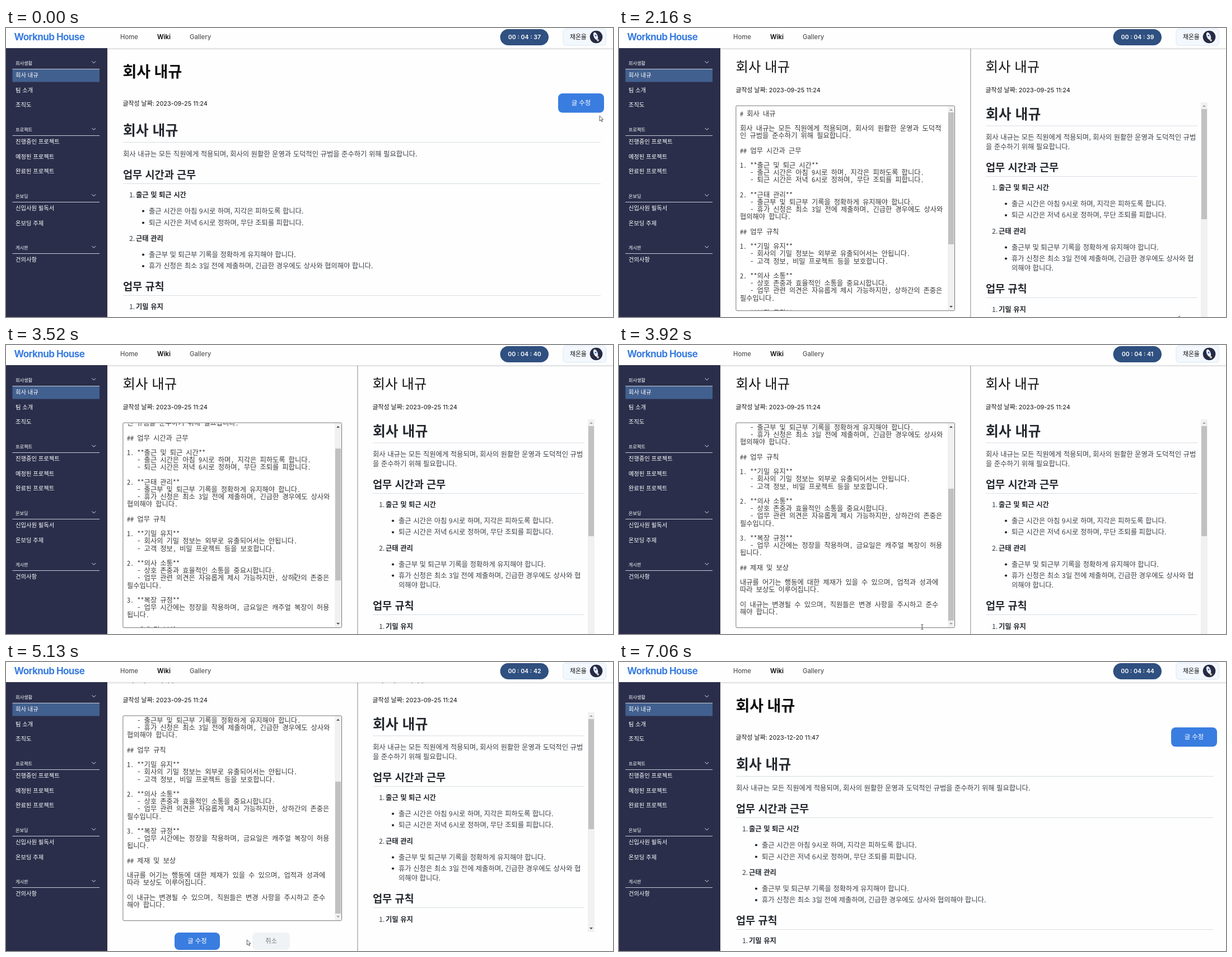
Recreate the animation shown at these times as an HTML page. Size 1084 by 517 pixels, loop 7.12 s.

```html
<!DOCTYPE html>
<html lang="ko">
<head>
<meta charset="utf-8">
<style>
html, body { margin: 0; width: 100%; height: 100%; overflow: hidden; background: #fefefe; }
svg { display: block; width: 100vw; height: 100vh; }
text { font-family: Inter, 'Noto Sans CJK KR', 'Noto Sans CJK', sans-serif; white-space: pre; }
.doc text { font-family: 'Noto Sans CJK KR', 'Noto Sans CJK', 'Noto Sans', sans-serif; }
.mono text { font-family: 'Noto Sans Mono CJK KR', 'Noto Sans Mono', monospace; }
</style>
</head>
<body>
<svg id="stage" viewBox="0 0 1084 517"></svg>
<script>
const LOOP = 7120;
const BLUE = '#3a7de0', HOVER = '#2f6ccb';
const BRAND = 'Worknub House', USER = '채온율';

// y is the vertical centre of the glyphs
const text = (x, y, str, size, fill = '#111', extra = '') =>
  `<text x="${x}" y="${(y + size * .37).toFixed(2)}" font-size="${size}" fill="${fill}" ${extra}>${str}</text>`;
const rect = (x, y, w, h, fill, extra = '') =>
  `<rect x="${x}" y="${y}" width="${w}" height="${h}" fill="${fill}" ${extra}/>`;
const group = (id, body, extra = '') => `<g id="${id}" ${extra}>${body}</g>`;
const clip = (id, x, y, w, h) => `<clipPath id="${id}">${rect(x, y, w, h, '#000')}</clipPath>`;
const BOLD = 'font-weight="700"', SEMI = 'font-weight="600"', MID = 'text-anchor="middle"';
const BRAND_STYLE = `${BOLD} letter-spacing="-.6"`;

const button = (id, x, y, w, h, label, fill, ink) =>
  rect(x, y, w, h, fill, `id="${id}" rx="8"`) + text(x + w / 2, y + h / 2 - .6, label, 11.4, ink, MID);

const triangle = (id, x, y, dir, fill) =>
  `<path id="${id}" d="M${x - 3},${y + dir * 1.5}h6l-3,${-dir * 3.2}z" fill="${fill}"/>`;

function scrollbar(id, x, top, bottom, thumbTop, thumbHeight) {
  const mid = x + 6;
  return rect(x, top, 12, bottom - top, '#f1f1f1') +
    rect(x + 1, thumbTop, 10, thumbHeight, '#c1c1c1', `id="${id}Thumb"`) +
    triangle(id + 'Up', mid, top + 6.5, 1, '#a3a3a3') +
    triangle(id + 'Down', mid, bottom - 6.5, -1, '#505050');
}

// Rendered markdown: each row is [kind, y, string]
function markdown(x, width, rows) {
  const ink = '#24292f', soft = '#3a3f45', size = 12.35;
  const rule = y => rect(x, y, width, 1, '#d8dee4');
  const kinds = {
    h1: (y, s) => text(x, y, s, 24.8, ink, SEMI) + rule(y + 21),
    h2: (y, s) => text(x, y, s, 18.6, ink, SEMI) + rule(y + 16),
    p: (y, s) => text(x, y, s, size, soft),
    num: (y, s) => text(x + 11, y, s.slice(0, 2), size, soft) + text(x + 23, y, s.slice(3), size, ink, SEMI),
    li: (y, s) => `<circle cx="${x + 36}" cy="${y + .5}" r="2.1" fill="${ink}"/>` + text(x + 46, y, s, size, soft),
    more: (y, s) => text(x + 46, y, s, size, soft)
  };
  return `<g class="doc">${rows.map(([kind, y, s]) => kinds[kind](y, s)).join('')}</g>`;
}

const DATE = '글작성 날짜:', DATE_SIZE = 10.9;
const TITLE = '회사 내규';
const intro = ['회사 내규는 모든 직원에게 적용되며, 회사의 원활한 운영과 도덕적인 규범', '을 준수하기 위해 필요합니다.'];
const hours = '업무 시간과 근무', rules = '업무 규칙';
const arrive = '출근 시간은 아침 9시로 하며, 지각은 피하도록 합니다.';
const leave = '퇴근 시간은 저녁 6시로 정하며, 무단 조퇴를 피합니다.';
const record = '출근부 및 퇴근부 기록을 정확하게 유지해야 합니다.';
const vacation = ['휴가 신청은 최소 3일 전에 제출하며, 긴급한 경우에도 상사와 협', '의해야 합니다.'];
const secret = '회사의 기밀 정보는 외부로 유출되어서는 안됩니다.';
const client = '고객 정보, 비밀 프로젝트 등을 보호합니다.';

const viewDoc = markdown(209, 853, [
  ['h1', 183, TITLE], ['p', 225, intro.join('')], ['h2', 262, hours],
  ['num', 298.5, '1. 출근 및 퇴근 시간'], ['li', 327, arrive], ['li', 348, leave],
  ['num', 376.5, '2. 근태 관리'], ['li', 405, record], ['li', 425.5, vacation.join('')],
  ['h2', 462, rules], ['num', 498.5, '1. 기밀 유지'], ['li', 527, secret], ['li', 548, client]
]);

const previewDoc = markdown(655, 378, [
  ['h1', 153.5, TITLE], ['p', 195, intro[0]], ['p', 212.5, intro[1]], ['h2', 249, hours],
  ['num', 285.5, '1. 출근 및 퇴근 시간'], ['li', 314, arrive], ['li', 334.5, leave],
  ['num', 363, '2. 근태 관리'], ['li', 392, record], ['li', 412, vacation[0]], ['more', 429.5, vacation[1]],
  ['h2', 466, rules], ['num', 503, '1. 기밀 유지']
]);

const markdownSource = `# ${TITLE}

회사 내규는 모든 직원에게 적용되며, 회사의 원활한 운영과 도덕적
인 규범을 준수하기 위해 필요합니다.

## ${hours}

1. **출근 및 퇴근 시간**
   - ${arrive}
   - ${leave}

2. **근태 관리**
   - ${record}
   - 휴가 신청은 최소 3일 전에 제출하며, 긴급한 경우에도 상사와
협의해야 합니다.

## ${rules}

1. **기밀 유지**
   - ${secret}
   - ${client}

2. **의사 소통**
   - 상호 존중과 효율적인 소통을 중요시합니다.
   - 업무 관련 의견은 자유롭게 제시 가능하지만, 상하간의 존중은
필수입니다.

3. **복장 규정**
   - 업무 시간에는 정장을 착용하며, 금요일은 캐주얼 복장이 허용
됩니다.

## 제재 및 보상

내규를 어기는 행동에 대한 제재가 있을 수 있으며, 업적과 성과에
따라 보상도 이루어집니다.

이 내규는 변경될 수 있으며, 직원들은 변경 사항을 주시하고 준수
해야 합니다.`;
const sourceLines = markdownSource.split('\n')
  .map((line, i) => line && text(216, 153 + i * 13.2, line, 12.25, '#383838')).join('');

const menu = [
  [62.5, 73, '회사생활', ['회사 내규', '팀 소개', '조직도']],
  [182, 192, '프로젝트', ['진행중인 프로젝트', '예정된 프로젝트', '완료된 프로젝트']],
  [300.5, 311, '온보딩', ['신입사원 필독서', '온보딩 주제']],
  [393, 403, '게시판', ['건의사항']]
].map(([y, line, label, items]) =>
  text(17, y, label, 8.2, '#fff') +
  `<path d="M153.5,${y - 3}l3.3,3.4 3.3,-3.4" fill="none" stroke="#e4e6ee"/>` +
  rect(11.5, line, 155.5, 1, '#c9cddb') +
  items.map((s, i) => text(17, line + 11.2 + i * 26.6, s, 10.3, '#fff')).join('')
).join('');

const view =
  group('viewPage',
    group('viewLoaded', text(208.5, 78, TITLE, 27, '#0a0a0a', BOLD) + viewDoc) +
    group('viewHead',
      text(208.5, 134.5, DATE, DATE_SIZE, '#111', 'id="viewDate"') +
      button('viewButton', 986, 117, 82, 34.5, '글 수정', BLUE, '#fff'))) +
  group('footer', rect(181, 467, 903, 50, '#f7f9fb') +
    text(268, 503.5, BRAND, 17, '#55585e', BRAND_STYLE) +
    text(561, 503.5, 'Contributors', 17, '#55585e', BRAND_STYLE));

const editDate = full => [208.5, 654.5].map(x =>
  text(x, 111, full ? DATE + ' 2023-09-25 11:24' : DATE, DATE_SIZE)).join('');
const edit =
  group('editPage',
    rect(208.9, 139.1, 390.6, 366.6, '#fff', 'rx="2" stroke="#767676"') +
    group('editBlank', editDate(false)) +
    group('editLoaded',
      editDate(true) + text(208.5, 69, TITLE, 24.4) + text(654.5, 69, TITLE, 24.4) +
      `<g class="mono" clip-path="url(#areaClip)">${group('source', sourceLines)}</g>` +
      scrollbar('area', 587, 140, 505, 151, 236) +
      `<g clip-path="url(#previewClip)">${previewDoc}</g>` +
      scrollbar('preview', 1039, 133, 526, 145, 197)) +
    button('saveButton', 301, 527, 81, 31, '글 수정', BLUE, '#fff') +
    button('cancelButton', 440, 527, 67, 31, '취소', '#eff3f6', '#777c84')) +
  rect(627, 37, 1.6, 480, '#b4b4b8', 'id="divider"');

const sidebar = rect(0, 36, 181, 481, '#2a2e4a') +
  group('menu', rect(11.5, 73, 155.5, 23.5, '#42608f') + menu);

const header = rect(0, 37, 1084, 2, '#000', 'opacity=".06"') +
  rect(0, 0, 1084, 36.5, '#fefefe') + rect(0, 36, 1084, 1, '#d9dade') +
  text(14.5, 16, BRAND, 17, BLUE, BRAND_STYLE) +
  text(204, 16, 'Home', 11.3, '#555', 'font-weight="500"') +
  text(270, 16, 'Wiki', 11.3, '#0a0a0a', SEMI) +
  text(328, 16, 'Gallery', 11.3, '#555', 'font-weight="500"') +
  rect(882.5, 2, 86.5, 29, '#2f5080', 'rx="14.5"') +
  text(926, 16, '', 10.6, '#fff', `${MID} ${SEMI} id="timer"`) +
  rect(995, 1.5, 76.5, 29.5, '#f3f8fe', 'rx="5" stroke="#d9e7f5"') +
  text(1007, 16, USER, 10.8) +
  '<circle cx="1054" cy="16" r="11.3" fill="#252a45"/>' +
  '<ellipse cx="1053" cy="14.5" rx="3.6" ry="7" fill="#e9edf5" transform="rotate(-22 1053 14.5)"/>' +
  '<circle cx="1053" cy="13.5" r="1.6" fill="#4773b8"/><circle cx="1057" cy="22" r="2" fill="#d8c9b0"/>';

const cursor = group('cursor',
  '<path id="arrow" d="M0,0v9.3l2.2,-2 1.5,3.4 1.5,-.7 -1.5,-3.2h2.9z" fill="#fff" stroke="#333" stroke-width=".8"/>' +
  '<path id="beam" d="M-2,-4.5h1.5l.5,.5 .5,-.5h1.5M0,-4v8M-2,4.5h1.5l.5,-.5 .5,.5h1.5" fill="none" stroke="#333" stroke-width=".9"/>' +
  '<path id="hand" d="M-1,0q1,-1 2,0v4l4.5,1q1.3,.4 1.2,2l-.8,4.5h-5.6l-3.6,-4.6q.4,-1.4 2.3,.2z" fill="#fff" stroke="#333" stroke-width=".8"/>');

document.getElementById('stage').innerHTML =
  `<defs>${clip('areaClip', 210, 140, 377, 365)}${clip('previewClip', 650, 133, 389, 393)}</defs>` +
  rect(0, 0, 1084, 517, '#fefefe') + view + edit + header + sidebar + cursor;

const el = {};
document.querySelectorAll('[id]').forEach(node => el[node.id] = node);
const show = (id, on) => el[id].setAttribute('display', on ? 'inline' : 'none');
const fill = (id, color) => el[id].setAttribute('fill', color);
const move = (id, x, y) => el[id].setAttribute('transform', `translate(${x.toFixed(2)} ${y.toFixed(2)})`);
const between = (t, a, b) => t >= a && t < b;

// Eased interpolation through rows of [time, ...values]
function track(t, keys) {
  const i = keys.findIndex(k => k[0] > t);
  if (i === 0) return keys[0].slice(1);
  if (i < 0) return keys[keys.length - 1].slice(1);
  const a = keys[i - 1], b = keys[i];
  const p = (t - a[0]) / (b[0] - a[0]), e = p * p * (3 - 2 * p);
  return a.slice(1).map((v, k) => v + (b[k + 1] - v) * e);
}

const pageScroll = [[4200, 0], [4440, 43], [6250, 43], [6480, 0]];
const areaScroll = [[3390, 0], [3572, 66], [3650, 66], [3850, 164]];
const pointer = [
  [40, 1060, 157], [370, 1027, 130], [1230, 1027, 130], [1520, 908, 290], [1890, 1000, 515],
  [2160, 1000, 515], [2830, 516, 414], [3650, 516, 414], [3900, 541, 504], [4060, 548, 515],
  [4480, 548, 515], [4900, 475, 499], [4930, 475, 499], [5390, 365, 494], [5920, 365, 494],
  [6300, 200, 440], [6870, 1040, 498], [7050, 1060, 517]
];

function render(t) {
  const editing = between(t, 770, 5720);
  const editReady = t >= 970;
  const viewReady = !between(t, 5720, 5890);
  const scroll = Math.round(track(t, pageScroll)[0]);
  const inner = Math.round(track(t, areaScroll)[0]);

  show('viewPage', !editing);
  show('viewLoaded', viewReady);
  show('footer', !viewReady);
  show('editPage', editing);
  show('divider', editing);
  show('editBlank', !editReady);
  show('editLoaded', editReady);
  show('menu', editing ? editReady : viewReady);

  // The empty title collapses while the page loads
  move('viewPage', 0, -scroll);
  move('viewHead', 0, viewReady ? 0 : -30);
  move('editPage', 0, -scroll);
  move('source', 0, -inner);
  move('areaThumb', 0, inner * 106 / 164);
  fill('areaUp', inner > 0 ? '#505050' : '#a3a3a3');
  fill('areaDown', inner < 164 ? '#505050' : '#a3a3a3');

  const stamp = t < 770 ? ' 2023-09-25 11:24' : ' 2023-12-20 11:47';
  el.viewDate.textContent = DATE + (viewReady ? stamp : '');
  el.timer.textContent = '00 : 04 : ' + (37 + Math.floor((t + 280) / 1000));

  const overEdit = between(t, 160, 770), overSave = between(t, 5150, 5720);
  fill('viewButton', overEdit ? HOVER : BLUE);
  fill('saveButton', overSave ? HOVER : BLUE);

  const hand = overEdit || overSave;
  const beam = between(t, 2700, 4000) || between(t, 5720, 6100);
  const [x, y] = track(t, pointer);
  move('cursor', x, y);
  show('cursor', t < 7050);
  show('hand', hand);
  show('beam', beam);
  show('arrow', !hand && !beam);
}

const start = performance.now();
function tick() {
  render((performance.now() - start) % LOOP);
  requestAnimationFrame(tick);
}
tick();
</script>
</body>
</html>
```
